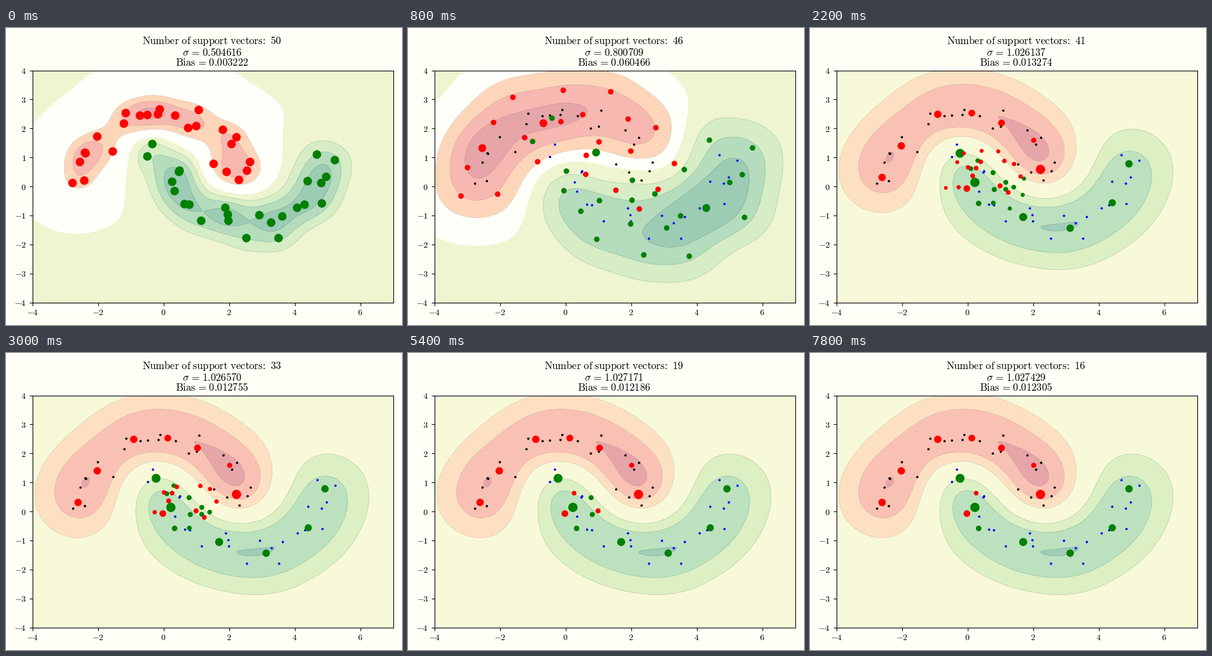
These frames come from a looping animation (640 px wide and 480 px high, 8 s). A matplotlib script:

```python
import numpy as np
import matplotlib.pyplot as plt
from matplotlib.animation import FuncAnimation
from matplotlib.colors import to_rgb

plt.rcParams["mathtext.fontset"] = "cm"
PAPER = "#fffff8"
W, H, DPI = 640, 480, 100
N_FRAMES, INTERVAL = 40, 200
LEFT, TOP, RIGHT, BOTTOM = 42, 68, 625, 443
UNIT_R = 6.94      # dot radius in pixels for a weight of one
EXPLORE = 4        # steps of spreading before the vectors settle
HUB = np.array([0.7, 0.1])

# Values at the key steps
KEYS = [0, 2, 4, 11, 19, 27, 39]
COUNT = [50, 48, 46, 41, 25, 19, 16]
SIGMA = [.504616, .299714, .800709, 1.026137, 1.027003, 1.027171, 1.027429]
BIAS = [.003222, .015524, .060466, .013274, .012237, .012186, .012305]

# Stage positions in pixels
RED = [(107, 250), (119, 216), (126, 246), (127, 201), (128, 202), (147, 175),
       (172, 199), (190, 154), (193, 137), (216, 141), (228, 140), (245, 139),
       (248, 131), (273, 141), (294, 161), (307, 158), (311, 132), (350, 164),
       (364, 187), (372, 176), (335, 219), (356, 232), (376, 245), (389, 230),
       (394, 216)]
GREEN = [(236, 187), (228, 207), (268, 248), (279, 232), (280, 230), (272, 263),
         (288, 284), (296, 285), (315, 311), (354, 290), (358, 301), (359, 311),
         (388, 339), (409, 302), (428, 314), (446, 304), (440, 339), (470, 290),
         (482, 285), (487, 247), (509, 250), (510, 283), (517, 240), (531, 213),
         (502, 204)]
# Vectors that survive: x, y, radius
LAST_RED = [(116, 241, 6), (147, 190, 6), (206, 139, 6), (261, 137, 5.5),
            (309, 153, 5.5), (361, 181, 4.2), (372, 228, 7.5), (253, 259, 5.4),
            (268, 226, 3.8)]
LAST_GREEN = [(242, 202, 7.2), (266, 249, 7.5), (272, 283, 4.5), (344, 305, 6.5),
              (420, 323, 6), (488, 282, 5.8), (515, 219, 6)]

# Fills from strong red to strong green; the late set has no zero line
EARLY_FILLS = ["#e5a5a9", "#f6b8b0", "#fdd5b9", "#fefff8",
               "#eef5d0", "#d6edc5", "#b5ddbd", "#9cccb4"]
LATE_FILLS = ["#e5a5a9", "#f9c1b3", "#fde0c2", "#f8f9d8",
              "#f8f9d8", "#dcf0c4", "#bce1be", "#9fcdb7"]


def rows_of(points, sign):
    """Rows of x, y, weight, class sign."""
    return np.array([((x - LEFT) * 11 / (RIGHT - LEFT) - 4,
                      4 - (y - TOP) * 8 / (BOTTOM - TOP),
                      (r[0] / UNIT_R) ** 2 if r else 1, sign)
                     for x, y, *r in points])


data = np.vstack([rows_of(RED, -1), rows_of(GREEN, 1)])
last = np.vstack([rows_of(LAST_RED, -1), rows_of(LAST_GREEN, 1)])
gx, gy = np.meshgrid(np.linspace(-4, 7, 236), np.linspace(-4, 4, 181))


def at(values, i):
    return np.interp(i, KEYS, values)


def field(rows, i):
    d2 = (gx[..., None] - rows[:, 0]) ** 2 + (gy[..., None] - rows[:, 1]) ** 2
    return np.exp(-d2 / (2 * at(SIGMA, i) ** 2)) @ (rows[:, 2] * rows[:, 3]) + at(BIAS, i)


def merge_closest(rows):
    """Join the two nearest rows of one class."""
    gap = np.hypot(*(rows[:, None, :2] - rows[None, :, :2]).transpose(2, 0, 1))
    gap[rows[:, None, 3] != rows[None, :, 3]] = np.inf
    np.fill_diagonal(gap, np.inf)
    a, b = np.unravel_index(gap.argmin(), gap.shape)
    joined = rows[a].copy()
    joined[:2] = np.average(rows[[a, b], :2], axis=0, weights=rows[[a, b], 2])
    joined[2] += rows[b, 2]
    return np.vstack([np.delete(rows, [a, b], axis=0), joined])


def spread(rows, reach=0.6, rate=0.22):
    """Same class repels, the other class attracts."""
    d = rows[:, None, :2] - rows[None, :, :2]
    pull = np.exp(-(d ** 2).sum(2) / (2 * reach ** 2))
    pull *= rows[:, None, 3] * rows[None, :, 3] * rows[None, :, 2]
    out = rows.copy()
    out[:, :2] += rate * (pull[..., None] * d).sum(1)
    return out


def explore():
    rows, path = data, []
    for i in range(EXPLORE + 1):
        if i:
            rows = spread(merge_closest(rows))
        scale = np.interp(i, [0, 2, EXPLORE], [1, 0.54, 0.42])
        path.append(rows * [1, 1, scale, 1])
    return path


def settle_plan(rows):
    """Pair survivors with their nearest rows; the rest gathers at the hub."""
    free, start = list(range(len(rows))), []
    for goal in last:
        j = min((n for n in free if rows[n, 3] == goal[3]),
                key=lambda n: np.hypot(*(rows[n, :2] - goal[:2])))
        free.remove(j)
        start.append(j)
    rest = rows[free]
    rest = rest[np.hypot(*(rest[:, :2] - HUB).T).argsort()]
    ends = rest.copy()
    ends[:, :2] = HUB + 0.35 * (rest[:, :2] - HUB)
    ends[:, 2] = 0.36 - 0.2 * np.linspace(0, 1, len(rest))
    return np.vstack([rows[start], rest]), np.vstack([last, ends])


path = explore()
begin, end = settle_plan(path[-1])
early, final = field(path[-1], EXPLORE), field(last, N_FRAMES)


def state(i):
    if i <= EXPLORE:
        return path[i], field(path[i], i)
    u = 1 - np.exp(-1.2 * (i - EXPLORE))
    rows = begin + (end - begin) * u
    return rows[:round(at(COUNT, i))], early + (final - early) * u


fig = plt.figure(figsize=(W / DPI, H / DPI), dpi=DPI, facecolor=PAPER)
ax = fig.add_axes([(LEFT + .5) / W, 1 - (BOTTOM + .5) / H,
                   (RIGHT - LEFT) / W, (BOTTOM - TOP) / H], facecolor=PAPER)
ax.set(xlim=(-4, 7), ylim=(-4, 4))
xt, yt = range(-4, 7, 2), range(-4, 5)
ax.set_xticks(xt, [f"${v}$" for v in xt])
ax.set_yticks(yt, [f"${v}$" for v in yt])


def dot_area(r):
    return (2 * r * 72 / DPI) ** 2


dots = {}
for sign, small, big in ((1, "blue", "green"), (-1, "black", "red")):
    own = data[data[:, 3] == sign]
    ax.scatter(own[:, 0], own[:, 1], s=dot_area(1.9), c=small, lw=0, zorder=3)
    dots[sign] = ax.scatter([], [], c=big, lw=0, zorder=5)
titles = [fig.text(333 / W, 1 - y / H, "", size=12, ha="center", va="baseline")
          for y in (26, 45, 61)]
contours = []


def draw_field(z, i):
    while contours:
        contours.pop().remove()
    fills = EARLY_FILLS if i <= EXPLORE else LATE_FILLS
    step = np.interp(i, [0, 2, 4], [1, 0.3, 0.4])
    levels = np.arange(-4, 5) * step
    levels[:4] -= step * max(0, 1 - i / 2)  # red bands start further out at first
    z = np.clip(z, levels[0] + 1e-6, levels[-1] - 1e-6)
    contours.append(ax.contourf(gx, gy, z, levels, colors=fills, zorder=0))
    edges = [1, 2, 3, 5, 6, 7]
    shades = [tuple(0.86 * np.array(to_rgb(fills[n - 1 if n < 4 else n]))) for n in edges]
    contours.append(ax.contour(gx, gy, z, levels[edges], colors=shades,
                               linewidths=0.5, linestyles="solid", zorder=1))


def update(i):
    rows, z = state(i)
    draw_field(z, i)
    for sign, scatter in dots.items():
        own = rows[rows[:, 3] == sign]
        scatter.set_offsets(own[:, :2])
        scatter.set_sizes(dot_area(UNIT_R * np.sqrt(own[:, 2])))
    eq = r"\hspace{0.13}=\hspace{0.13}"
    titles[0].set_text(r"$\mathrm{Number\ of\ support\ vectors\!:\hspace{0.38}%d}$" % len(rows))
    titles[1].set_text(r"$\sigma%s%.6f$" % (eq, at(SIGMA, i)))
    titles[2].set_text(r"$\mathrm{Bias}%s%.6f$" % (eq, at(BIAS, i)))
    return []


anim = FuncAnimation(fig, update, frames=N_FRAMES, init_func=lambda: [],
                     interval=INTERVAL, repeat=True, repeat_delay=0, blit=False)
plt.show()
```
